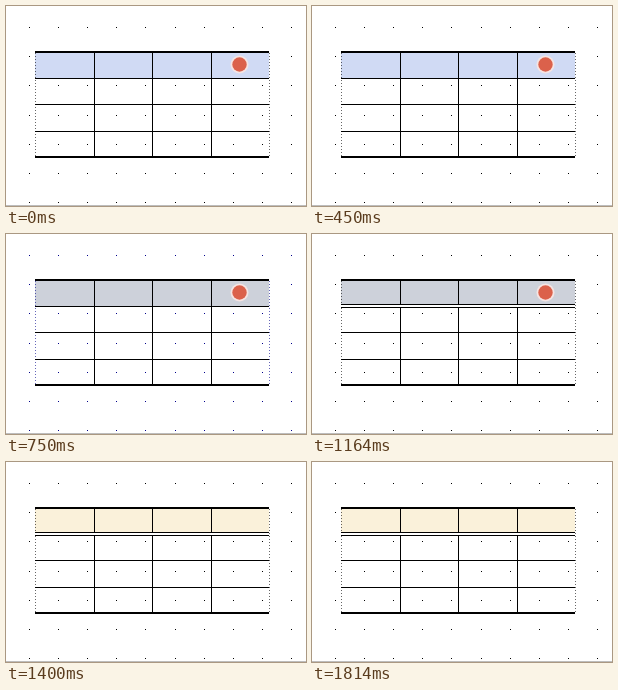
An HTML page with a canvas for the animation above (2090 ms loop, 300 by 200 pixels).

```html
<!DOCTYPE html>
<html lang="en">
<head>
<meta charset="utf-8">
<title>Table header styles</title>
<style>
html, body { margin: 0; width: 100%; height: 100%; overflow: hidden; background: #fff; }
canvas { display: block; }
</style>
</head>
<body>
<canvas id="stage" width="300" height="200"></canvas>
<script>
const ctx = document.getElementById('stage').getContext('2d');
const LOOP = 2090;
const LEFT = 29, RIGHT = 263, TOP = 45, BOTTOM = 150, HEADER_END = 72;

const states = [
  { from: 0, header: '#d0daf4', dots: '#000', marker: true, double: false },
  { from: 750, header: '#cdd1da', dots: '#00008b', marker: true, double: false },
  { from: 810, header: '#cdd1da', dots: '#000', marker: true, double: true },
  { from: 1400, header: '#faf1da', dots: '#000', marker: false, double: true }
];

function rect(color, x, y, w, h) {
  ctx.fillStyle = color;
  ctx.fillRect(x, y, w, h);
}

function disc(color, x, y, radius) {
  ctx.fillStyle = color;
  ctx.beginPath();
  ctx.arc(x, y, radius, 0, Math.PI * 2);
  ctx.fill();
}

function drawGrid(color) {
  for (let row = 0; row < 7; row++)
    for (let col = 0; col < 10; col++)
      rect(color, Math.round(23 + col * 29.12), Math.round(21 + row * 29.17), 1, 1);
}

function drawTable({ header, dots, double }) {
  const width = RIGHT - LEFT;
  rect(header, LEFT, TOP, width, HEADER_END - TOP);

  // Dotted outer edges
  ctx.globalAlpha = 0.6;
  for (let y = TOP + 2; y < BOTTOM; y += 3)
    for (const x of [LEFT, RIGHT]) rect(dots, x, y, 1, 1);
  ctx.globalAlpha = 1;

  for (const x of [88, 146, 205]) rect('#000', x, TOP, 1, BOTTOM - TOP);
  for (const y of [98, 125]) rect('#000', LEFT, y, width, 1);
  for (const y of [TOP, BOTTOM]) rect('#000', LEFT, y, width, 2);

  if (double) {
    rect('#fff', LEFT, 71, width, 2);
    for (const y of [70, 73]) rect('#000', LEFT, y, width, 1);
  } else {
    rect('#000', LEFT, HEADER_END, width, 1);
  }
}

function draw(now) {
  const time = now % LOOP;
  const state = states.findLast(s => time >= s.from);
  rect('#fff', 0, 0, 300, 200);
  drawGrid(state.dots);
  drawTable(state);
  if (state.marker) {
    disc('#f6e4e2', 233.5, 58.5, 9);
    disc('#db614b', 233.5, 58.5, 7.2);
  }
  rect('#bdbdbd', 0, 199, 300, 1);
  requestAnimationFrame(() => draw(performance.now() - start));
}

const start = performance.now();
draw(0);
</script>
</body>
</html>
```
